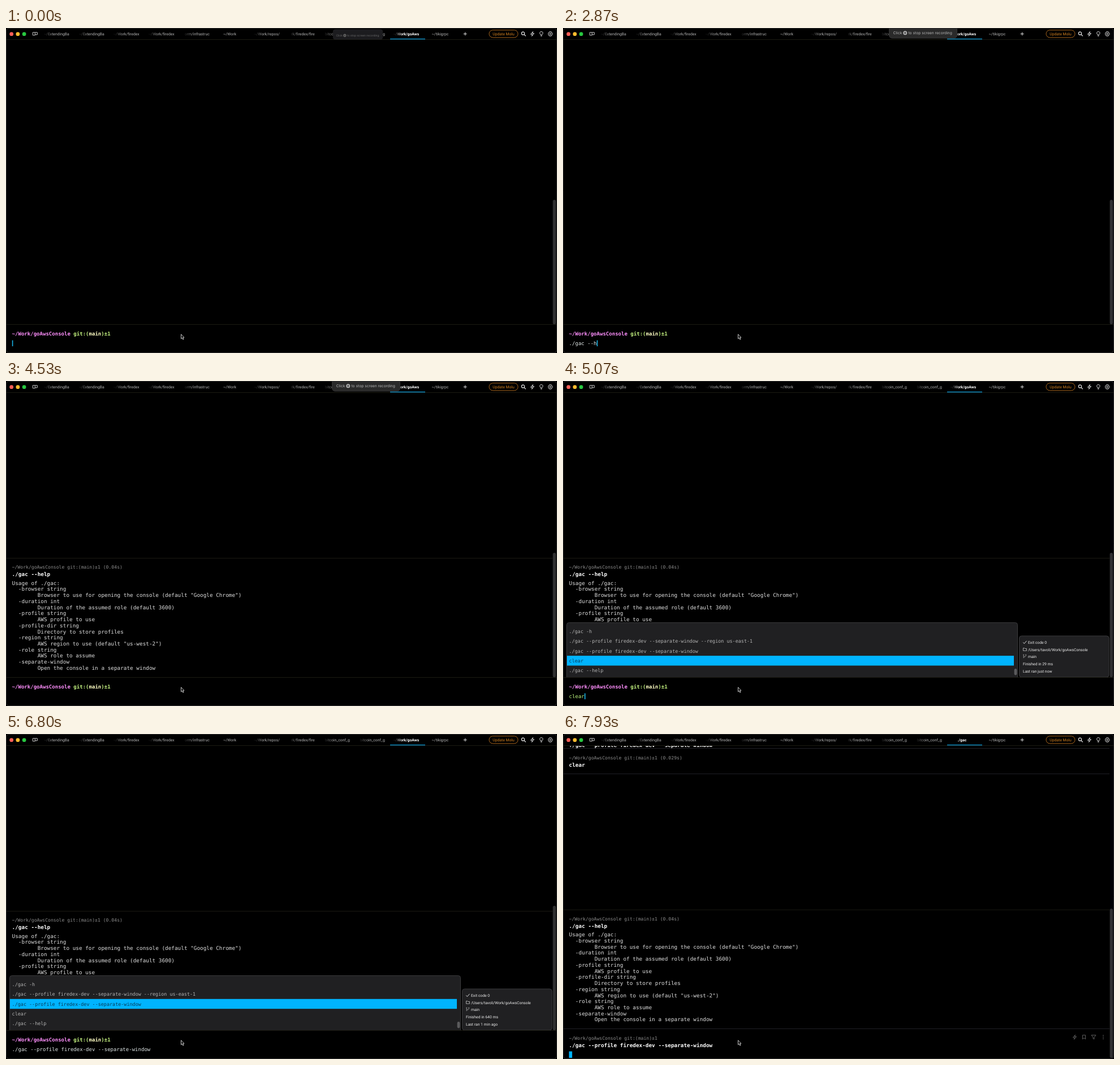
Recreate the animation shown at these times as an HTML page with a canvas. Size 974x575 px, loop 8 s.

```html
<!DOCTYPE html>
<html lang="en">
<head>
<meta charset="utf-8">
<title>Terminal session</title>
<style>
html, body { margin: 0; width: 100%; height: 100%; overflow: hidden; background: #000; }
canvas { display: block; }
</style>
</head>
<body>
<canvas id="stage" width="974" height="575"></canvas>
<script>
const ctx = document.getElementById('stage').getContext('2d');
const LOOP = 8000, BLINK = 530;
const MONO = '"DejaVu Sans Mono", monospace';
const UI = 'Roboto, sans-serif';
const BLUE = '#00b4ff', LINE = '#1b1a12';

const PATH = '~/Work/goAwsConsole';
const PROMPT = PATH + ' git:(main)±1';
const WINDOW_CMD = './gac --profile firedex-dev --separate-window';
const HELP = [
  'Usage of ./gac:',
  '  -browser string',
  '        Browser to use for opening the console (default "Google Chrome")',
  '  -duration int',
  '        Duration of the assumed role (default 3600)',
  '  -profile string',
  '        AWS profile to use',
  '  -profile-dir string',
  '        Directory to store profiles',
  '  -region string',
  '        AWS region to use (default "us-west-2")',
  '  -role string',
  '        AWS role to assume',
  '  -separate-window',
  '        Open the console in a separate window'
];
const HISTORY = [
  { cmd: './gac -h', took: '40 ms', ran: '2 min ago' },
  { cmd: WINDOW_CMD + ' --region us-east-1', took: '1.06 sec', ran: '2 min ago' },
  { cmd: WINDOW_CMD, took: '640 ms', ran: '1 min ago' },
  { cmd: 'clear', took: '29 ms', ran: 'just now' },
  { cmd: './gac --help', took: '40 ms', ran: 'just now' }
];
const TABS = ['~/ExtendingBa', '~/ExtendingBa', '~/Work/firedex', '~/Work/firedex',
  'orm/infrastruc', '~/Work', '~/Work/repos/', 'rk/firedex/fire',
  'bitcoin_conf_g', 'bitcoin_conf_g', '~/Work/goAws', '~/tikigrpc'];

const KEYS = [270, 330, 470, 600, 670, 1070, 1270, 1530, 2870, 2930, 3070, 3200];
const HELP_AT = 3730, TIP_END = 4660, RUN_AT = 7270, TITLE_AT = 7470;
const PICKS = [[4670, 4], [5000, 3], [5530, 2], [5930, 1], [6260, 2]];
const EVENTS = [...KEYS, HELP_AT, ...PICKS.map(p => p[0])];

// y is the vertical middle of the capitals
function text(s, x, y, size, color, { weight = 400, font = MONO, align = 'left' } = {}) {
  ctx.font = `${weight} ${size}px ${font}`;
  ctx.textAlign = align;
  ctx.fillStyle = color;
  ctx.fillText(s, x, y + size * 0.35);
  return ctx.measureText(s).width;
}

function rect(x, y, w, h, color) {
  ctx.fillStyle = color;
  ctx.fillRect(x, y, w, h);
}

function box(x, y, w, h, r, fill, stroke) {
  ctx.beginPath();
  ctx.roundRect(x, y, w, h, r);
  if (fill) { ctx.fillStyle = fill; ctx.fill(); }
  if (stroke) { ctx.strokeStyle = stroke; ctx.lineWidth = 1; ctx.stroke(); }
}

function disc(x, y, r, color) {
  ctx.beginPath();
  ctx.arc(x, y, r, 0, 7);
  ctx.fillStyle = color;
  ctx.fill();
}

function icon(d, x, y, color, { fill, width = 1 } = {}) {
  ctx.save();
  ctx.translate(x, y);
  const shape = new Path2D(d);
  if (fill) { ctx.fillStyle = fill; ctx.fill(shape); }
  ctx.strokeStyle = color;
  ctx.lineWidth = width;
  ctx.stroke(shape);
  ctx.restore();
}

const BOLT = 'M1 -4L-3 .8H0L-1 4L3 -.8H0Z';

function drawTab(label, i, active) {
  const mid = 85.7 + 62 * i;
  const style = { font: UI, weight: active ? 600 : 400 };
  const color = active ? '#fff' : '#b4b4b4';
  if (label.length < 12) {
    text(label, mid - 0.3, 10.5, 6.8, color, { ...style, align: 'center' });
    return;
  }
  const right = mid + (active ? 24.5 : 26);
  const fade = ctx.createLinearGradient(right - 44, 0, right - 29, 0);
  fade.addColorStop(0, 'rgba(180,180,180,.12)');
  fade.addColorStop(1, color);
  text(label, right, 10.5, 6.8, fade, { ...style, align: 'right' });
}

function drawTopBar(t) {
  rect(0, 0, 974, 20, '#000');
  rect(0, 20, 974, 1, LINE);
  ['#ff5f57', '#febc2e', '#28c840'].forEach((c, i) => disc(9.7 + 11.2 * i, 10.7, 3.4, c));
  icon('M-4 -2.5H0V2.5H-4ZM0 -2.5H4V1.5H0', 51.3, 10.3, '#c8c8c8');
  TABS.forEach((label, i) => {
    const active = i === 10;
    drawTab(active && t >= TITLE_AT ? './gac' : label, i, active);
  });
  rect(679, 18.8, 62, 1.3, '#0a9ad8');
  icon('M-3 0H3M0 -3V3', 811.7, 10.4, '#ddd');
  box(854, 3.7, 51, 13.2, 6.6, null, '#a5641c');
  text('Update Molu', 879.5, 10.5, 6.8, '#d3801f', { font: UI, align: 'center' });
  icon('M1.8 -.8A2.6 2.6 0 1 1 -3.4 -.8A2.6 2.6 0 1 1 1.8 -.8M1.2 1.2L4 4', 914.8, 10.3, '#e6e6e6', { width: 1.2 });
  icon(BOLT, 930.5, 10.4, '#e6e6e6');
  icon('M-1.3 2V1C-4 -1 -2.7 -4 0 -4S4 -1 1.3 1V2ZM-1.2 3.8H1.2', 946.3, 10.4, '#e6e6e6');
  icon('M-1.8 -3.6H1.8L3.8 0L1.8 3.6H-1.8L-3.8 0ZM1.3 0A1.3 1.3 0 1 1 -1.3 0A1.3 1.3 0 1 1 1.3 0', 962.2, 10.4, '#e6e6e6');
}

function drawTip(t) {
  if (t >= TIP_END) return;
  const grow = t < 70 ? 0 : t < 130 ? 0.7 : 1;
  const scale = 0.73 + 0.27 * grow;
  ctx.save();
  ctx.translate(622 + 14.5 * grow, 13 - 4.5 * grow);
  ctx.scale(scale, scale);
  box(-60, -14, 120, 23.5, 5, grow ? '#2a2a2a' : '#1c1c1f', grow ? '#343434' : '#232326');
  const color = grow ? '#b5b5b5' : '#6a6a6a';
  const style = { font: 'Inter, sans-serif' };
  text('Click', -52.7, 0, 6.7, color, style);
  disc(-31.7, 0.2, 3.5, color);
  disc(-31.7, 0.2, 1.7, '#2b2b2b');
  disc(-31.7, 0.2, 0.8, color);
  text('to stop screen recording', -26, 0, 6.7, color, style);
  ctx.restore();
}

function drawHeader(y, cmd, time) {
  text(PROMPT + (time ? ` (${time})` : ''), 10.6, y, 8.12, '#8c8c8c');
  text(cmd, 10.6, y + 12.4, 9.37, '#fff', { weight: 700 });
}

function drawHelp(top) {
  rect(0, top, 966, 1, LINE);
  drawHeader(top + 16.5, './gac --help', '0.04s');
  HELP.forEach((line, i) => text(line, 10.6, top + 44.4 + 10.73 * i, 9.37, '#dedede'));
}

function drawHistory(pick) {
  box(6.5, 427.5, 797, 97, [4, 4, 0, 0], '#202022', '#39393b');
  HISTORY.forEach(({ cmd }, i) => {
    const y = 443 + 17.3 * i;
    if (i === pick) rect(7, y - 8.8, 790, 17.4, BLUE);
    text(cmd, 10.6, y, 8.44, i === pick ? '#073a55' : '#b4b4b4');
  });
  box(797.6, 509, 4.8, 11.5, 2.4, '#5a5a5c');

  box(806.5, 451, 158.5, 73, 4, '#202022', '#39393b');
  const { took, ran } = HISTORY[pick];
  const style = { font: UI };
  ['Exit code 0', '/Users/tavoli/Work/goAwsConsole', 'main', `Finished in ${took}`, `Last ran ${ran}`]
    .forEach((s, i) => text(s, i < 3 ? 822 : 813, 462.5 + 12.7 * i, 6.8, '#ececec', style));
  icon('M-3 0L-1 2.2L3.2 -2.6', 816.3, 462.4, '#ddd');
  icon('M-3 -2.3H-.8L0 -1.4H3V2.4H-3Z', 816.5, 474.8, '#ccc', { width: 0.8 });
  icon('M-2 -3V3M2 -3V-1Q2 .5 -2 1M-3 -3H-1M1 -3H3', 816.2, 487.3, '#aaa', { width: 0.8 });
}

function typedText(t, pick) {
  if (pick >= 0) return HISTORY[pick].cmd;
  if (t >= HELP_AT) return '';
  return './gac --help'.slice(0, KEYS.filter(k => k <= t).length);
}

function drawPrompt(t, pick) {
  rect(0, 524, 974, 1, LINE);
  let x = 10.6;
  [[PATH, '#ff8ffd'], [' git:(', '#c6f681'], ['main', '#fefdc2'], [')±1', '#c6f681']]
    .forEach(([s, c]) => { x += text(s, x, 541.3, 9.04, c, { weight: 700 }); });

  const typed = typedText(t, pick);
  const w = text(typed, 10.6, 557.7, 9.04, typed === 'clear' ? '#b9f27c' : '#dfe6e6');
  const last = EVENTS.filter(e => e <= t).pop() ?? -260;
  if ((t - last) % (2 * BLINK) < BLINK) rect(10.8 + w, 552.5, 1.6, 10.6, '#18b4e8');
}

function drawRunning() {
  text(WINDOW_CMD, 10.6, 20, 9.37, '#fff', { weight: 700 });
  rect(0, 25, 966, 1, '#202026');
  drawHeader(42.5, 'clear', '0.029s');
  rect(0, 70, 966, 1, '#202026');
  drawHelp(310.6);
  rect(0, 521, 966, 1, '#202026');
  drawHeader(538.5, WINDOW_CMD);
  rect(10.6, 561.5, 5.6, 11.5, BLUE);
  icon(BOLT, 904.5, 536.3, '#606060');
  icon('M-2.6 -3.5H2.6V3.5L0 1.5L-2.6 3.5Z', 921, 536.3, '#606060');
  icon('M-4 -3.5H4L1 .3V3.5L-1 2.6V.3Z', 938, 536.3, '#606060');
  [-3, 0, 3].forEach(d => disc(955, 536.3 + d, 0.8, '#707070'));
}

function draw(t) {
  ctx.textRendering = 'geometricPrecision';
  rect(0, 0, 974, 575, '#000');
  const running = t >= RUN_AT;
  if (running) {
    drawRunning();
  } else {
    const pick = PICKS.filter(p => p[0] <= t).pop()?.[1] ?? -1;
    if (t >= HELP_AT) drawHelp(313);
    if (pick >= 0) {
      rect(0, 427, 966, 97, '#000');
      drawHistory(pick);
    }
    drawPrompt(t, pick);
  }
  box(966.6, running ? 309 : 304, 5.4, running ? 264 : 220, 2.6, '#303030');
  drawTopBar(t);
  drawTip(t);
  icon('M0 0V8L1.9 6.3L3.2 9.3L4.6 8.7L3.3 5.8H5.4Z', 309.5, 541.8, '#d8d8d8', { fill: '#000', width: 0.9 });
  box(0.5, 0.5, 973, 574, 5, null, '#2c2c2c');
}

function tick() {
  draw(performance.now() % LOOP);
  requestAnimationFrame(tick);
}
tick();
</script>
</body>
</html>
```
